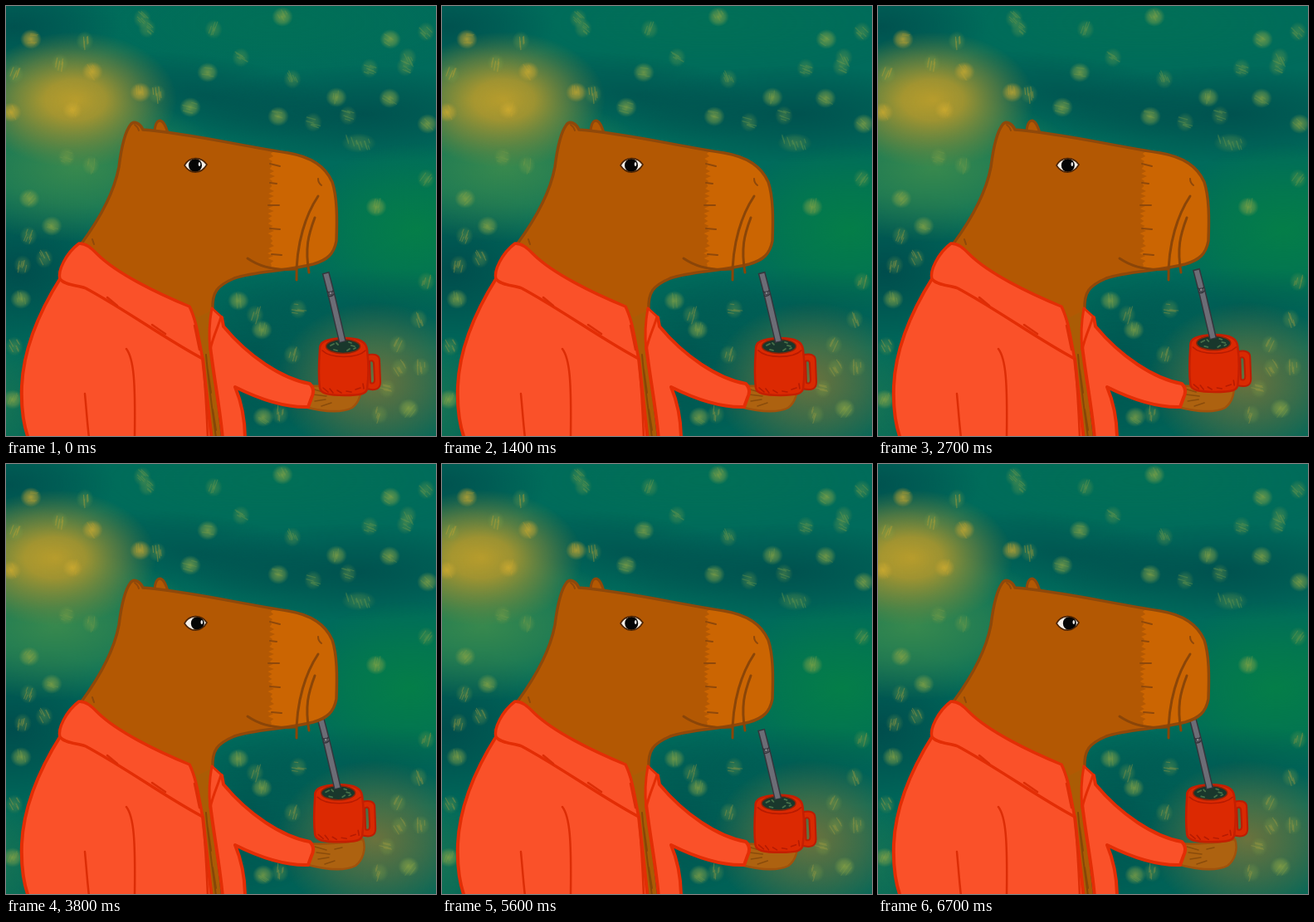
These frames come from a looping animation (518x518 px, 6800 ms). An HTML page:

```html
<!DOCTYPE html>
<html lang="en">
<head>
<meta charset="utf-8">
<title>Capybara sipping from a mug</title>
<style>
  html, body { margin: 0; width: 100%; height: 100%; overflow: hidden; background: #006b5c; }
  svg { display: block; width: 100vw; height: 100vh; }
  path, line { stroke-linecap: round; stroke-linejoin: round; }
  .line { fill: none; }
  .butt { stroke-linecap: butt; }
  #glow { animation: drift 6.8s steps(68) infinite; }
  #haze { animation: drift 6.8s steps(68) infinite; --far: -16px; }
  @keyframes drift { to { transform: translateX(var(--far, -44px)); } }
</style>
</head>
<body>
<svg viewBox="0 0 518 518" preserveAspectRatio="none">
  <defs>
    <radialGradient id="dark"><stop stop-color="#004a4b"/><stop offset=".5" stop-color="#004a4b" stop-opacity=".55"/><stop offset="1" stop-color="#004a4b" stop-opacity="0"/></radialGradient>
    <radialGradient id="green"><stop stop-color="#058046"/><stop offset=".5" stop-color="#058046" stop-opacity=".6"/><stop offset="1" stop-color="#058046" stop-opacity="0"/></radialGradient>
    <radialGradient id="moss"><stop stop-color="#46904a"/><stop offset=".5" stop-color="#46904a" stop-opacity=".6"/><stop offset="1" stop-color="#46904a" stop-opacity="0"/></radialGradient>
    <radialGradient id="olive"><stop stop-color="#76743a"/><stop offset=".5" stop-color="#76743a" stop-opacity=".55"/><stop offset="1" stop-color="#76743a" stop-opacity="0"/></radialGradient>
    <radialGradient id="gold"><stop stop-color="#bd9f2b"/><stop offset=".3" stop-color="#b0982d" stop-opacity=".9"/><stop offset=".65" stop-color="#918c35" stop-opacity=".5"/><stop offset="1" stop-color="#7a8638" stop-opacity="0"/></radialGradient>
    <radialGradient id="amber"><stop stop-color="#d4ae30"/><stop offset=".6" stop-color="#c3a431" stop-opacity=".6"/><stop offset="1" stop-color="#b39a30" stop-opacity="0"/></radialGradient>
    <radialGradient id="lime"><stop stop-color="#93a944"/><stop offset=".6" stop-color="#83a248" stop-opacity=".6"/><stop offset="1" stop-color="#709a4c" stop-opacity="0"/></radialGradient>
    <clipPath id="headClip"><use href="#headShape"/></clipPath>
    <clipPath id="eyeClip"><use href="#eyeShape"/></clipPath>
  </defs>

  <rect width="518" height="518" fill="#006b5c"/>
  <g id="haze">
    <ellipse cx="330" cy="20" rx="260" ry="70" fill="url(#green)" opacity=".22"/>
    <ellipse cx="10" cy="25" rx="130" ry="60" fill="url(#dark)" opacity=".75"/>
    <ellipse cx="240" cy="108" rx="170" ry="48" fill="url(#dark)" opacity=".6" transform="rotate(8 240 108)"/>
    <ellipse cx="430" cy="130" rx="210" ry="58" fill="url(#dark)" opacity=".75"/>
    <ellipse cx="495" cy="270" rx="150" ry="105" fill="url(#green)" opacity=".9"/>
    <ellipse cx="440" cy="365" rx="180" ry="50" fill="url(#dark)" opacity=".45"/>
    <ellipse cx="300" cy="415" rx="120" ry="100" fill="url(#dark)" opacity=".5"/>
    <ellipse cx="15" cy="320" rx="150" ry="100" fill="url(#dark)" opacity=".9"/>
    <ellipse cx="259" cy="490" rx="360" ry="110" fill="url(#dark)" opacity=".4"/>
  </g>
  <ellipse cx="445" cy="452" rx="120" ry="95" fill="url(#olive)" opacity=".9"/>
  <ellipse cx="0" cy="480" rx="50" ry="80" fill="url(#moss)" opacity=".3"/>
  <g id="glow">
    <ellipse cx="85" cy="195" rx="180" ry="90" fill="url(#moss)" opacity=".8"/>
    <ellipse cx="84" cy="113" rx="122" ry="82" fill="url(#gold)"/>
    <ellipse cx="40" cy="113" rx="100" ry="66" fill="url(#gold)" opacity=".3"/>
  </g>
  <g id="specks"></g>

  <g id="hand">
    <path d="M360 457C380 459 408 457 430 452C434 464 430 477 421 484C407 491 382 488 360 482Z" fill="#ad6210" stroke="#a0520c" stroke-width="2.5"/>
    <path class="line" d="M372 461l14 4M374 468l16 2M376 476l13-2M384 482l12-4M396 464l9-2" stroke="#8a4c0b" stroke-width="1.5"/>
  </g>

  <g id="mug">
    <path fill-rule="evenodd" d="M434 421C443 418 450 420 450 427L451 453C451 461 446 464 434 461ZM438 428L439 454Q444 456 444 450L443 430Q442 426 438 428Z" fill="#d92a02" stroke="#bd1c02" stroke-width="2"/>
    <path d="M378 414C377 404 386 401 407 400C427 400 434 405 435 414C437 430 437 446 435 461C434 467 428 469 408 469C388 469 379 467 378 460C376 444 377 428 378 414Z" fill="#dc2902" stroke="#c41f02" stroke-width="2.5"/>
    <path class="line" d="M381 415C391 425 423 425 433 415M382 460l6 5M390 461l4 5M399 463l5 3M410 464l6 1M421 462l6-2M430 455l1 6" stroke="#b71b02" stroke-width="1.6"/>
    <ellipse cx="406" cy="410" rx="20.5" ry="8.5" fill="#19372c" stroke="#8f2408" stroke-width="1.5"/>
    <path class="line" d="M391 409l4-2M395 414l4 1M398 406l2 2M411 415l3-2M416 409l4 1M413 405l3 1M419 413l2-1" stroke="#47704a" stroke-width="1.8"/>
    <path class="line butt" d="M385 321C389 336 391 344 393 352L405.500 405" stroke="#35363d" stroke-width="9"/>
    <path class="line butt" d="M385.400 322.500C389 336 391 344 393 352L405.200 404" stroke="#6c6d76" stroke-width="6"/>
    <path class="line" d="M387 344q4 3 7-1M388 349q4 2 7-2" stroke="#33343b" stroke-width="1.5"/>
    <circle cx="391" cy="346" r="2" fill="#82838a" stroke="#33343b"/>
  </g>

  <path d="M179 152C179 145 181 138 186 138C191 140 193 146 195 153Z" fill="#b35803" stroke="#8f480a" stroke-width="3"/>
  <path id="headShape" d="M80 300L91 286C113 256 130 226 136 194C139 170 143 152 150 143C154 137 162 142 165 149C220 153 285 169 340 177C370 182 386 196 393 212C399 230 399 255 398 283C395 299 387 306 370 311C335 320 300 319 275 328C254 337 248 345 249 366L246 405L260 530H246L235 425L140 360Z" fill="#b35803"/>
  <g clip-path="url(#headClip)">
    <path id="muzzle" fill="#cb6502"/>
    <path d="M221 362L231 375L249 366L246 405L262 530H244L235 425Z" fill="#a66008" opacity=".6"/>
  </g>
  <path class="line" d="M91 286C113 256 130 226 136 194C139 170 143 152 150 143C154 137 162 142 165 149C220 153 285 169 340 177C370 182 386 196 393 212C399 230 399 255 398 283C395 299 387 306 370 311C335 320 300 319 275 328C254 337 248 345 249 366" stroke="#8f480a" stroke-width="3.5"/>
  <path class="line" d="M318 190l12 3M318 213l8 1M316 240l13 0M318 268l12 1M320 299l12 1M376 208q0 5 4 8M155 143q4 3 5 7M104 281l2 6" stroke="#8f480a" stroke-width="2"/>
  <path class="line" d="M376 229C362 250 349 285 350 330M372 255C364 276 360 292 365 321M291 304C307 315 325 319 348 317" stroke="#8a4508" stroke-width="3"/>

  <path id="eyeShape" d="M215 192C221 181 235 181 242 191C235 203 222 203 215 192Z" fill="#f4efe8"/>
  <g clip-path="url(#eyeClip)">
    <g id="pupil">
      <circle cx="228" cy="192" r="8" fill="#050505"/>
      <ellipse cx="233" cy="190.500" rx="1.300" ry="2.600" fill="#e8e6e4"/>
    </g>
  </g>
  <path class="line" d="M215 192C221 181 235 181 242 191C235 203 222 203 215 192Z" stroke="#4c2404" stroke-width="1.6"/>

  <g fill="#fa5129" stroke="#e32d05" stroke-width="4">
    <path d="M246 410C246 396 250 384 260 375L262 386C292 422 332 449 366 455Q373 462 368 472L364 483C333 484 300 471 276 459C284 478 288 497 288 522H261C258 485 250 445 246 410Z"/>
    <path d="M246 414C244 396 245 380 248 364L259 374C256 386 250 396 246 414Z" stroke-width="3"/>
    <path d="M66 327C42 365 21 411 19 458C18 485 21 506 28 524H248L237 425L150 330Z"/>
    <path d="M88 286C72 298 62 319 65 329C72 337 86 336 96 340C146 367 190 400 237 425C232 402 230 380 221 362C182 346 133 322 110 299C103 292 97 286 88 286Z" stroke-width="3.5"/>
  </g>
  <path class="line" d="M145 413C154 425 156 452 155 520M95 467C97 488 98 504 100 520M237 425Q241 470 243 520M122 351l12 10M176 384l16 11M227 385l6 29" stroke="#dc2d06" stroke-width="2.5"/>
  <path class="line" d="M241 420C244 455 249 490 253 520M243 438l4 28M249 486l4 25" stroke="#854708" stroke-width="2"/>
</svg>

<script>
const LOOP = 6800, STEP = 100;
const SIP = LOOP / 4.8, MOVE = 370;
const $ = id => document.getElementById(id);

let seed = 17;
const rand = () => (seed = (seed * 16807) % 2147483647) / 2147483647;
const around = n => (rand() - 0.5) * 2 * n;

const dots = [
  30, 40, 104, 79, 6, 128, 162, 104, 80, 125, 222, 122, 243, 80, 333, 13,
  328, 133, 398, 110, 463, 40, 508, 142, 462, 111, 446, 242, 55, 265, 28, 232,
  18, 353, 280, 355, 310, 495, 485, 485, 8, 474, 308, 390
];
const scratches = [
  11, 82, 65, 69, 164, 15, 170, 27, 250, 28, 283, 62, 345, 88, 370, 140,
  412, 132, 438, 75, 506, 31, 481, 73, 425, 165, 506, 208, 484, 62, 95, 42,
  27, 277, 20, 312, 46, 304, 102, 192, 73, 182, 182, 106, 352, 365, 300, 372,
  500, 435, 459, 461, 472, 408, 497, 377, 506, 332, 345, 420, 10, 410, 330, 492,
  474, 436, 450, 492
];

const nearGlow = (x, y) => x < 185 && y > 30 && y < 140;

function strokes(x, y, wide, count, color, alpha) {
  const slope = around(1.1) + 1.2;
  let d = "";
  for (let i = 0; i < count; i++) {
    const len = 2 + rand() * 4;
    const dx = len * Math.cos(slope), dy = len * Math.sin(slope);
    d += `M${x + around(wide) - dx} ${y + around(6) - dy}l${2 * dx} ${2 * dy}`;
  }
  return `<path class="line" d="${d}" stroke="${color}" stroke-width="1.2" opacity="${alpha}"/>`;
}

function drawSpecks() {
  let out = "";
  for (let i = 0; i < dots.length; i += 2) {
    const [x, y] = [dots[i], dots[i + 1]];
    const warm = nearGlow(x, y);
    out += `<ellipse cx="${x}" cy="${y}" rx="13" ry="12" fill="url(#${warm ? "amber" : "lime"})" opacity="${warm ? 0.75 : 0.7}"/>`;
    out += strokes(x, y, 5, 5, warm ? "#c9a631" : "#8ca746", 0.25);
  }
  for (let i = 0; i < scratches.length; i += 2) {
    const [x, y] = [scratches[i], scratches[i + 1]];
    const warm = nearGlow(x, y);
    const wide = x === 425 ? 15 : 5;
    const color = warm ? "#c2a233" : y > 260 ? "#a09a40" : "#6f984c";
    out += `<ellipse cx="${x}" cy="${y}" rx="${wide + 6}" ry="12" fill="url(#lime)" opacity=".35"/>`;
    out += strokes(x, y, wide, wide > 6 ? 12 : 6, color, 0.4);
  }
  $("specks").innerHTML = out;
}

function drawMuzzle() {
  let d = "M410 160";
  for (let y = 160; y <= 330; y += 3) d += `L${318 + (y % 2 ? 4 : -1) + around(2)} ${y}`;
  $("muzzle").setAttribute("d", d + "L410 330Z");
}

// 0 with the mug lowered, 1 with the straw in the mouth
function lift(t) {
  const p = t % SIP;
  const s = Math.min(1, p / MOVE, (SIP - p) / MOVE);
  return s * s * (3 - 2 * s);
}

const shift = (id, x, y) => $(id).setAttribute("transform", `translate(${x} ${y})`);

function frame(now) {
  const t = Math.floor((now % LOOP) / STEP) * STEP;
  const up = lift(t);
  shift("mug", -5.8 * up, -13.7 * up);
  shift("hand", -4 * (1 - up), 0);
  shift("pupil", 2.8 * up, 0);
  requestAnimationFrame(frame);
}

drawSpecks();
drawMuzzle();
requestAnimationFrame(frame);
</script>
</body>
</html>
```
